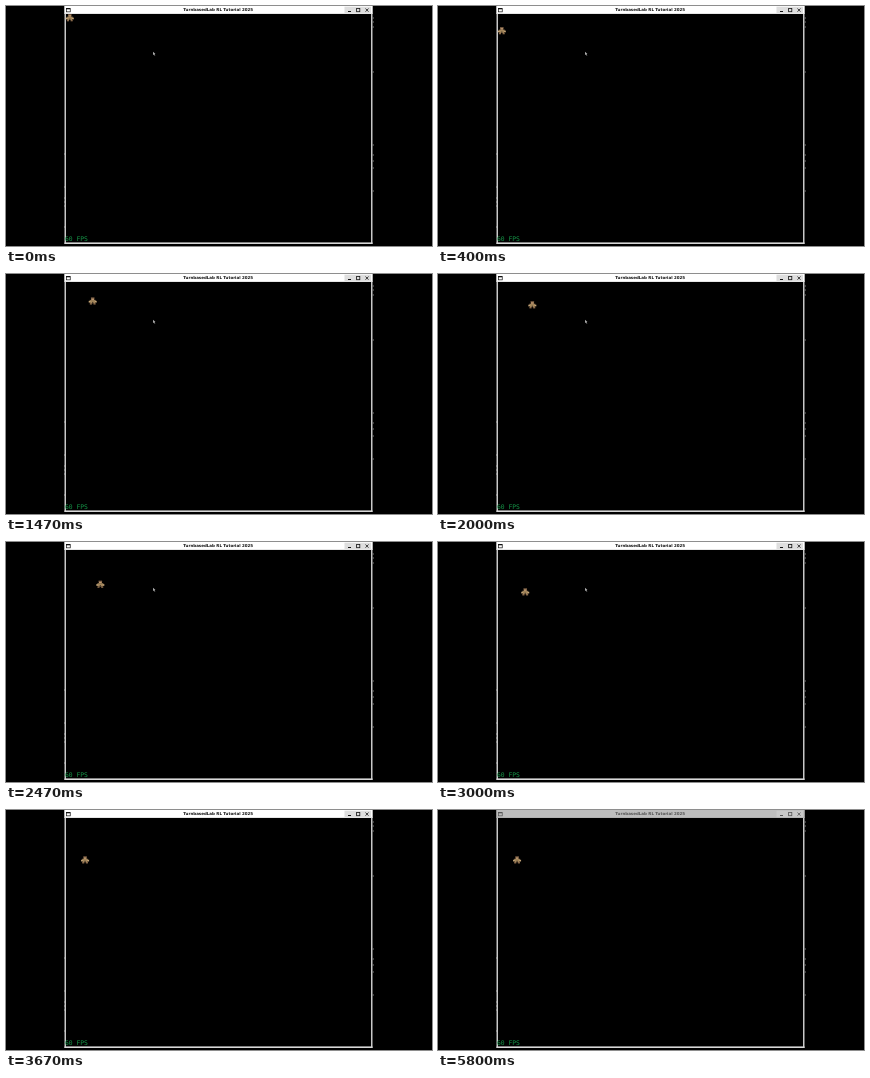
Animation of 426x240 px, one loop 5990 ms. Source, as an HTML page with a canvas:

```html
<!DOCTYPE html>
<html lang="en">
<head>
<meta charset="utf-8">
<title>Tile movement</title>
<style>
  html, body { margin: 0; width: 100%; height: 100%; overflow: hidden; background: #000; }
  canvas { display: block; }
</style>
</head>
<body>
<canvas id="stage" width="426" height="240"></canvas>
<script>
const ctx = document.getElementById('stage').getContext('2d');
const LOOP = 5990, TICK = 66.7, TILE = 7.63;
const ORIGIN = { x: 60, y: 8 };

// Each key press: start time, tile offset, visible steps, progress at the first step.
const moves = [
  [70, 0, 1, 3, 0.7], [400, 0, 1, 3, 0.7],
  [730, 1, 0, 3, 0.72], [1070, 1, 0, 3, 0.73], [1400, 1, 0, 2, 0.92], [1730, 1, 0, 3, 0.7],
  [2000, 0, 1, 4, 0.5], [2330, 0, 1, 3, 0.7], [2670, 0, 1, 3, 0.7],
  [3000, -1, 0, 2, 0.93], [3270, -1, 0, 3, 0.7]
];

function rect(color, x, y, w, h) {
  ctx.fillStyle = color;
  ctx.fillRect(x, y, w, h);
}

function text(value, x, y, font, color, align = 'left') {
  ctx.font = font;
  ctx.fillStyle = color;
  ctx.textAlign = align;
  ctx.fillText(value, x, y);
}

// The remaining distance shrinks by a fixed ratio per tick, then snaps to the tile.
function heroPosition(time) {
  let x = 0.5, y = 0.5;
  for (const [start, dx, dy, steps, first] of moves) {
    if (time < start) break;
    const step = Math.floor((time - start + 4) / TICK);
    const progress = step >= steps - 1 ? 1 : 1 - (1 - first) * 0.28 ** step;
    x += dx * progress;
    y += dy * progress;
  }
  return [ORIGIN.x + x * TILE, ORIGIN.y + y * TILE];
}

function drawHero(time) {
  const [x, y] = heroPosition(time);
  ctx.save();
  ctx.translate(x, y);
  rect('#765b42', -1.8, -3.7, 3.6, 1.2);
  rect('#c49a70', -1.5, -2.7, 3, 1.8);
  rect('#81694b', -3, -1.2, 6, 1.2);
  rect('#c4a477', -4, -0.2, 8, 1.7);
  rect('#a4875b', -2.3, -0.8, 4.6, 3);
  rect('#49382b', -0.6, 0.8, 1.2, 1.4);
  rect('#8b6b4c', -2.9, 2, 2.1, 1.5);
  rect('#8b6b4c', 0.8, 2, 2.1, 1.5);
  ctx.restore();
}

function drawCursor(time) {
  if (time >= 3670) return;
  const tick = Math.max(0, Math.floor((time - 3470 + 4) / TICK) + 1);
  const p = (tick / 3) ** 2;
  ctx.save();
  ctx.translate(147 + 29 * p, 45.8 - 34 * p);
  ctx.beginPath();
  ctx.moveTo(0, 0);
  ctx.lineTo(0, 3.2);
  ctx.lineTo(1, 2.6);
  ctx.lineTo(1.7, 4);
  ctx.lineTo(2.3, 3.6);
  ctx.lineTo(1.6, 2.3);
  ctx.lineTo(2.5, 2.2);
  ctx.closePath();
  ctx.fillStyle = '#aaa';
  ctx.fill();
  ctx.restore();
}

function drawWindow(active) {
  const bar = active ? '#fff' : '#bdbdbd';
  const ink = active ? '#111' : '#555';
  rect('#c8c8c8', 58.5, 0, 1.5, 238);
  rect('#c8c8c8', 365, 0, 1.5, 238);
  rect('#d8d8d8', 58.5, 236.4, 308, 1.6);
  rect(bar, 58.5, 0, 308, 8);
  rect(active ? '#d5d5d5' : '#aaa', 58.5, 7.4, 308, 0.6);
  text('TurnbasedLab RL Tutorial 2025', 212.2, 5.4, 'bold 4px "DejaVu Sans", sans-serif', ink, 'center');

  rect(ink, 60, 2, 4.6, 4.2);
  rect(bar, 60.7, 3.3, 3.2, 2.2);

  rect(active ? '#dedede' : '#c8c8c8', 338.5, 0.7, 26.5, 6.5);
  rect(ink, 342, 5, 3, 1);
  ctx.strokeStyle = ink;
  ctx.lineWidth = 0.8;
  ctx.strokeRect(350.6, 2.5, 3.2, 3.2);
  ctx.beginPath();
  ctx.moveTo(359.5, 2.5);
  ctx.lineTo(362.5, 5.7);
  ctx.moveTo(362.5, 2.5);
  ctx.lineTo(359.5, 5.7);
  ctx.stroke();
}

function drawEdgeSpecks() {
  for (const y of [147, 180, 191, 195, 199, 220]) rect('#888', 58, y, 1, 2);
  for (const y of [11, 15, 20, 65, 138, 148, 154, 161, 184]) rect('#777', 366.5, y, 1, 2);
}

function draw(now) {
  const time = now % LOOP;
  rect('#000', 0, 0, 426, 240);
  drawWindow(time < 5800);
  drawEdgeSpecks();
  drawHero(time);
  drawCursor(time);
  text('60 FPS', 59, 234.6, '6.35px "DejaVu Sans Mono", monospace', '#159447');
  requestAnimationFrame(draw);
}

requestAnimationFrame(draw);
</script>
</body>
</html>
```
